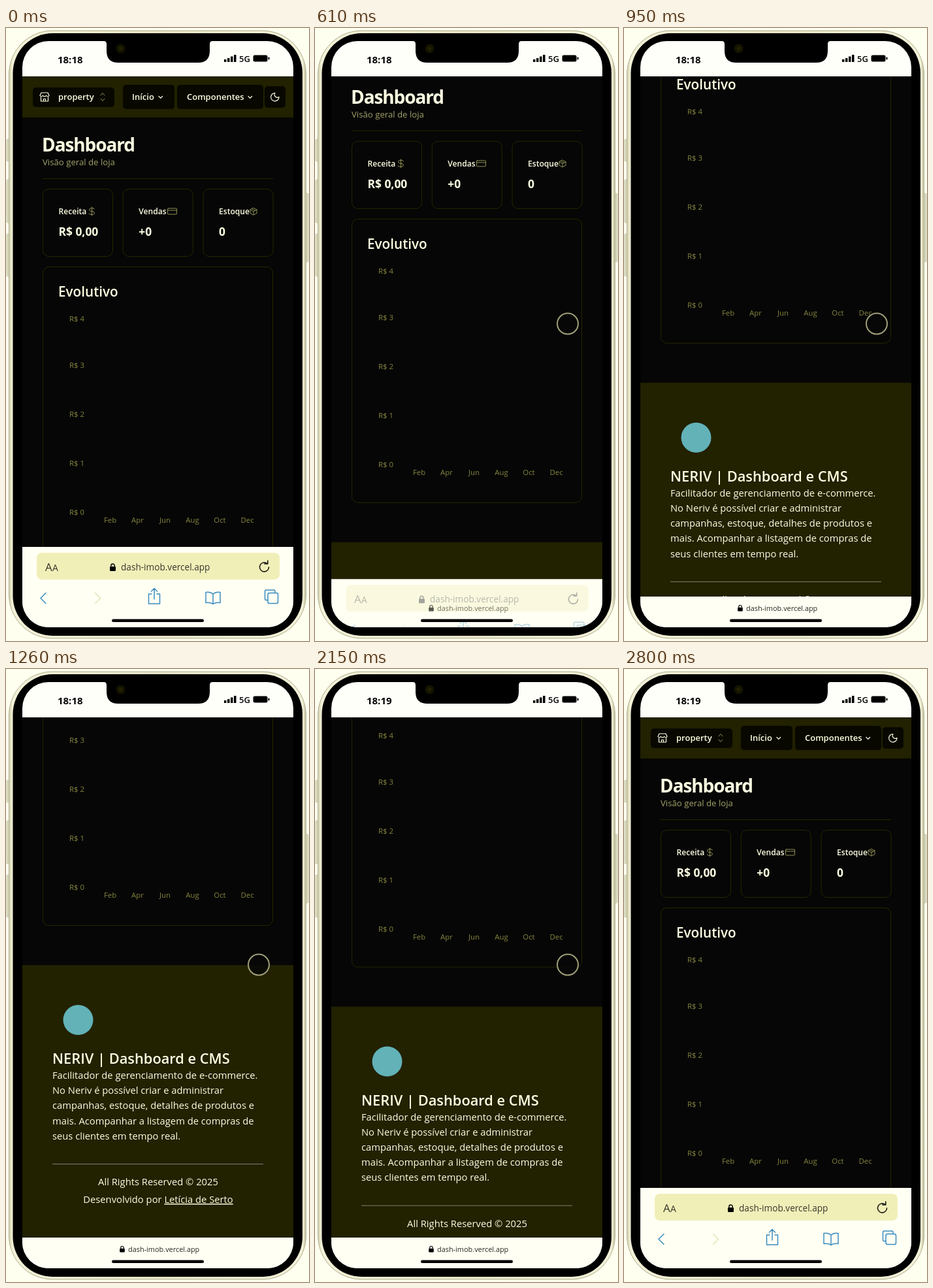
Write an HTML page that moves like this. It is 464 px wide and 938 px high and loops after 3.06 s.

```html
<!DOCTYPE html>
<html lang="pt">
<head>
<meta charset="utf-8">
<title>Dashboard</title>
<style>
  html, body { margin: 0; width: 100%; height: 100%; overflow: hidden; background: #fffff0; }
  svg { display: block; width: 100%; height: 100%; }
  text { font-family: "Open Sans", "Noto Sans", sans-serif; white-space: pre; }
  .semi { font-weight: 600; }
  .bold { font-weight: 700; }
  .page text { fill: #ffffe2; }
  .page .muted { fill: #a3a26a; }
  .page .axis { fill: #86853f; font-size: 11.4px; }
  .nav { font-size: 13px; font-weight: 600; }
  .label { font-size: 12.1px; font-weight: 600; }
  .value { font-size: 17.4px; font-weight: 700; }
  .body { font-size: 14.75px; }
  .line { fill: none; stroke: #262500; }
  .btn { fill: #080800; }
  .icon { fill: none; stroke-linecap: round; stroke-linejoin: round; }
  .light { stroke: #ffffe2; stroke-width: 1.2; }
  .dim { stroke: #8f8e55; stroke-width: 1; }
  .blue { stroke: #3a8cc0; stroke-width: 1.5; }
</style>
</head>
<body>
<svg viewBox="0 0 464 938" preserveAspectRatio="none">
  <defs>
    <clipPath id="screen"><rect x="25" y="20" width="415" height="897" rx="40"/></clipPath>
    <clipPath id="view"><rect x="25" y="74" width="415" height="800"/></clipPath>
    <linearGradient id="rim">
      <stop offset="0" stop-color="#d2d0ae"/>
      <stop offset=".012" stop-color="#f3f1d8"/>
      <stop offset=".5" stop-color="#e6e4c6"/>
      <stop offset=".988" stop-color="#f3f1d8"/>
      <stop offset="1" stop-color="#c4c2a0"/>
    </linearGradient>
    <g id="lock">
      <rect x="-4.5" y="-1" width="9" height="7" rx="1.2"/>
      <path d="M-2.7 0v-2.3a2.7 2.7 0 0 1 5.4 0V0" fill="none" stroke="#000" stroke-width="1.4"/>
    </g>
  </defs>

  <!-- phone body -->
  <g fill="#dcdabf" stroke="#b9b796" stroke-width=".6">
    <rect x="1" y="170" width="5" height="34" rx="1.5"/>
    <rect x="1" y="232" width="5" height="66" rx="1.5"/>
    <rect x="1" y="315" width="5" height="65" rx="1.5"/>
    <rect x="458" y="253" width="5" height="105" rx="1.5"/>
  </g>
  <rect x="4.5" y="4" width="455" height="930" rx="67" fill="url(#rim)" stroke="#b0ae8c"/>
  <rect x="10.5" y="8" width="443.5" height="922" rx="61"/>

  <g clip-path="url(#screen)">
    <rect x="25" y="20" width="415" height="897" fill="#fffffa"/>
    <g clip-path="url(#view)">
      <rect x="25" y="74" width="415" height="800" fill="#060606"/>
      <g id="page" class="page">
        <rect x="25" y="74" width="415" height="63" fill="#222100"/>
        <g class="btn">
          <rect x="41" y="91" width="125" height="30" rx="5"/>
          <rect x="179" y="87" width="79" height="37" rx="5"/>
          <rect x="262" y="87" width="132" height="37" rx="5"/>
          <rect x="396" y="89" width="32" height="33" rx="5"/>
        </g>
        <g class="icon light">
          <path d="M54 99h10l2 4.500q-2 2.500-4 0q-3 2.500-6 0q-2 2.500-4 0zM53.500 105.500v6.500h11v-6.500M57.500 112v-3.500h3v3.500"/>
          <path d="M234 104.500l2.800 2.800 2.800-2.800M371 104.500l2.800 2.800 2.800-2.800"/>
          <path d="M412 99.500a4.300 4.300 0 0 0 6 6a6.200 6.200 0 1 1-6-6z"/>
          <path class="dim" d="M145 103l3-3.500 3 3.500M145 108l3 3.500 3-3.500"/>
        </g>
        <g class="nav">
          <text x="80" y="110">property</text>
          <text x="193" y="110">Início</text>
          <text x="277" y="110">Componentes</text>
        </g>

        <text x="55" y="189" class="bold" font-size="28" letter-spacing="-1.1">Dashboard</text>
        <text x="56" y="210" class="muted" font-size="13.2">Visão geral de loja</text>
        <path class="line" d="M56 230.500H409"/>

        <g id="cards"></g>
        <g class="icon dim">
          <path d="M131.500 274v13M135.500 277q-1-1.500-4-1.500q-4 0-4 2.500t4 2.500t4 2.500t-4 2.500q-3 0-4.500-1.500"/>
          <path d="M248.500 276h12q1 0 1 1v7q0 1-1 1h-12q-1 0-1-1v-7q0-1 1-1zM247.500 279h14"/>
          <path d="M379 275.500l5 2.500v5.500l-5 2.500-5-2.500v-5.500zM374 278l5 2.700 5-2.700M379 280.700v5.300M376.500 276.700l5 2.700"/>
        </g>

        <rect class="line" x="56.500" y="365.500" width="352" height="434" rx="9"/>
        <text x="80" y="411" class="semi" font-size="20.7">Evolutivo</text>
        <g id="axes"></g>

        <rect x="25" y="860" width="415" height="430" fill="#222100"/>
        <circle cx="110.500" cy="944" r="23" fill="#62b2b8"/>
        <text x="71" y="1011" class="semi" font-size="21.8">NERIV | Dashboard e CMS</text>
        <g id="about" class="body"></g>
        <path d="M71 1164.500H394" stroke="#82816a"/>
        <g class="body">
          <text x="233" y="1197" text-anchor="middle">All Rights Reserved © 2025</text>
          <text x="233" y="1224" text-anchor="middle">Desenvolvido por <tspan text-decoration="underline">Letícia de Serto</tspan></text>
        </g>
      </g>
    </g>

    <!-- browser bar -->
    <rect id="panel" x="25" y="794" width="415" height="130" fill="#fffff4"/>
    <g id="full">
      <rect x="47" y="803" width="372" height="41" rx="8" fill="#f1efb8"/>
      <g fill="#37372c">
        <text x="60" y="831" font-size="17">A</text>
        <text x="71" y="831" font-size="14">A</text>
        <text x="176" y="830" font-size="13.600">dash-imob.vercel.app</text>
      </g>
      <use href="#lock" x="163.500" y="825"/>
      <path class="icon" stroke="#1a1a14" stroke-width="1.6" d="M400 819.500a7 7 0 1 0 2.500 5.500M400.800 815v5h-5"/>
      <g class="icon blue">
        <path d="M61 864.500l-8 8 8 8"/>
        <path d="M136.500 864.500l8 8-8 8" stroke="#e6e5b4"/>
        <path d="M223 866h-4.500v15h17v-15H231M227 874v-16M222.500 862l4.500-4.500 4.500 4.500"/>
        <path d="M317 866q-4-3.500-11-2.500v16q7-1 11 2q4-3 11-2v-16q-7-1-11 2.500v15.500"/>
        <rect x="401" y="864.500" width="15.500" height="16" rx="2.500"/>
        <path d="M401 875.500h-2.500q-2 0-2-2v-11.500q0-2 2-2h11.500q2 0 2 2v2.500"/>
      </g>
    </g>
    <g id="mini">
      <text x="187" y="891.500" font-size="10.900" fill="#26261e">dash-imob.vercel.app</text>
      <use href="#lock" transform="translate(178 887.500) scale(.85)"/>
    </g>
    <rect x="162" y="904.500" width="141" height="4.500" rx="2.200"/>

    <!-- status bar -->
    <path d="M150 20q4 0 4 5v10q0 18 18 18h122q18 0 18-18v-10q0-5 4-5z"/>
    <circle cx="175.500" cy="31.500" r="7" fill="#131300"/>
    <circle cx="175.500" cy="31.500" r="3" fill="#222100"/>
    <text id="clock" x="79" y="54" class="bold" font-size="15"></text>
    <path d="M334 48h3.500v4h-3.500zM339 46h3.500v6H339zM344 43.500h3.500v8.500H344zM349 41h3.500v11H349z"/>
    <text x="357" y="51.500" class="semi" font-size="13">5G</text>
    <rect x="378.500" y="41.500" width="22" height="10" rx="2.500"/>
    <rect x="401.500" y="44.500" width="2" height="4" rx="1"/>
  </g>

  <circle id="touch" cx="387" cy="452.500" r="16" fill="#080808" fill-opacity=".85" stroke="#a09f78" stroke-width="2"/>
</svg>
<script>
  const LOOP = 3060, TICK = 33.8, END = 407;
  const $ = id => document.getElementById(id);
  const clamp = v => Math.min(1, Math.max(0, v));
  const smooth = u => u * u * (3 - 2 * u);
  const text = (x, y, s, attrs = "") => `<text x="${x}" y="${y}" ${attrs}>${s}</text>`;

  $("cards").innerHTML = [["Receita", "R$ 0,00"], ["Vendas", "+0"], ["Estoque", "0"]]
    .map(([label, value], i) => {
      const x = 56.5 + i * 122.75;
      return `<rect class="line" x="${x}" y="246.5" width="107" height="103" rx="9"/>` +
        text(x + 24, 285, label, 'class="label"') + text(x + 24, 318, value, 'class="value"');
    }).join("");

  const axis = 'class="axis"';
  $("axes").innerHTML =
    [449, 520, 595, 670, 745].map((y, i) => text(97, y, "R$ " + (4 - i), axis)).join("") +
    ["Feb", "Apr", "Jun", "Aug", "Oct", "Dec"]
      .map((m, i) => text(159.5 + 42 * i, 757, m, axis + ' text-anchor="middle"')).join("");

  $("about").innerHTML = [
    "Facilitador de gerenciamento de e-commerce.",
    "No Neriv é possível criar e administrar",
    "campanhas, estoque, detalhes de produtos e",
    "mais. Acompanhar a listagem de compras de",
    "seus clientes em tempo real."
  ].map((s, i) => text(71, 1034 + 23.2 * i, s)).join("");

  // whole ticks elapsed since a start time
  const ticks = (t, start) => Math.floor((t - start + 5) / TICK);

  // steady drag, slowing glide, then an eased return to the top
  function scrollAt(t) {
    const back = ticks(t, 2080);
    if (back >= 0) return END * (1 - smooth(clamp((back + 1) / 12)));
    const k = ticks(t, 480);
    if (k <= 15) return 24.4 * Math.max(0, k - 1);
    return END - 65.4 * (1 - clamp((k - 15) / 8)) ** 3;
  }

  const collapsedAt = t => t < 2000
    ? smooth(clamp(ticks(t, 510) / 5))
    : 1 - smooth(clamp(ticks(t, 2220) / 5));

  function draw() {
    const t = performance.now() % LOOP;
    const c = collapsedAt(t);
    $("page").setAttribute("transform", `translate(0 ${-scrollAt(t)})`);
    $("panel").setAttribute("y", 794 + 76 * c);
    $("full").setAttribute("transform", `translate(0 ${76 * c})`);
    $("full").setAttribute("opacity", 1 - c);
    $("mini").setAttribute("opacity", c);
    $("touch").setAttribute("opacity", t < 480 || t >= 2800 ? 0 : t < 2760 ? 1 : 0.5);
    $("clock").textContent = t < 1770 ? "18:18" : "18:19";
    requestAnimationFrame(draw);
  }
  draw();
</script>
</body>
</html>
```
